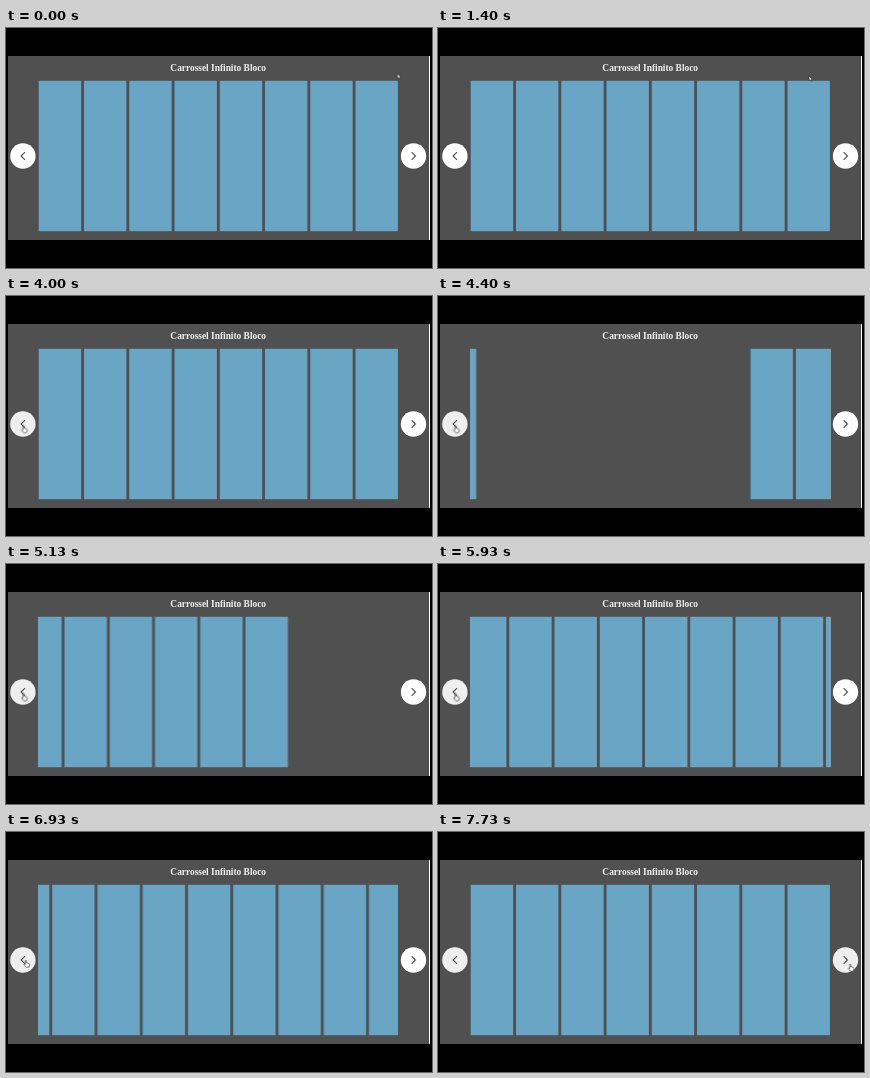
An HTML page that plays this animation: 426x240 px, repeating every 8000 ms.

```html
<!DOCTYPE html>
<html lang="pt">
<head>
<meta charset="utf-8">
<title>Carrossel</title>
<style>
  html, body { margin: 0; width: 100%; height: 100%; overflow: hidden; background: #000; }
  svg { display: block; width: 100vw; height: 100vh; }
  text { font: bold 9.4px "Liberation Serif", "Times New Roman", serif; fill: #f0f0f0; text-anchor: middle; }
  .soft { filter: blur(.35px); }
  .chevron { fill: none; stroke: #4c4c4c; stroke-width: 1.1; }
  .cursor path { fill: #fff; stroke: #222; stroke-width: .6; stroke-linejoin: round; }
</style>
</head>
<body>
<svg viewBox="0 0 426 240">
  <defs><clipPath id="view"><rect x="32.6" y="52" width="359.5" height="152"/></clipPath></defs>
  <rect x="2" y="28" width="421" height="184" fill="#505050"/>
  <rect x="423" y="28" width="1" height="184" fill="#fff"/>
  <g class="soft">
    <text x="212.2" y="43">Carrossel Infinito Bloco</text>
    <g clip-path="url(#view)"><g id="track"></g></g>
    <circle id="prev" cx="16.9" cy="128" r="12.7"/>
    <path class="chevron" d="M19 124.1 L15.1 128 L19 131.9"/>
    <circle id="next" cx="407.5" cy="128" r="12.7"/>
    <path class="chevron" d="M405.6 124.1 L409.5 128 L405.6 131.9"/>
    <g id="cursor" class="cursor">
      <path id="arrow" d="M0 0 V4.6 L1.1 3.7 L1.9 5.3 L2.7 4.9 L2 3.4 L3.3 3.3 Z"/>
      <path id="hand" d="M-.6 .4 Q0 -.4 .6 .4 V2.8 L3.2 3.5 Q3.9 3.8 3.7 4.8 L3.1 7.2 H.2 L-1.9 4.6 Q-1.8 3.8 -.6 4.5 Z"/>
    </g>
  </g>
</svg>
<script>
const LOOP = 8000, FPS = 15;
const LEFT = 32.75, PITCH = 45.25, PER_PAGE = 8, PAGE = PITCH * PER_PAGE;
const $ = id => document.getElementById(id);

// Pages queue up to the left; the first one reached is only partly filled.
const pageSizes = [8, 2, 8, 8, 8];
pageSizes.forEach((size, page) => {
  for (let i = 0; i < size; i++) {
    const block = document.createElementNS("http://www.w3.org/2000/svg", "rect");
    const attrs = { x: LEFT - page * PAGE + i * PITCH, y: 52.8, width: 42.4, height: 150.4, fill: "#69a5c4" };
    for (const name in attrs) block.setAttribute(name, attrs[name]);
    $("track").append(block);
  }
});

// steps: [time, x, y, easing to the next step]
function animate(el, steps) {
  const frames = steps.map(([time, x, y, easing = "linear"]) => ({
    offset: time / LOOP, transform: `translate(${x}px, ${y}px)`, easing
  }));
  const anim = el.animate(frames, { duration: LOOP, fill: "both" });
  anim.pause();
  return anim;
}

const SLIDE = 500;
const slideStarts = [4065, 4899, 5565, 6537];
const slides = slideStarts.flatMap((start, i) => [
  [start, i * PAGE, 0, "ease-in-out"],
  [start + SLIDE, (i + 1) * PAGE, 0]
]);
const end = slideStarts.length * PAGE;

const moves = [
  [0, 391.5, 45.8], [1267, 391.5, 45.8, "ease-in-out"],
  [1733, 271, 59], [1867, 271, 59, "ease-in-out"],
  [2733, 139.2, 73.2, "ease-in"],
  [3200, 80, 120], [3430, 42, 141, "ease-out"],
  [3600, 27, 131], [3800, 17.5, 129.5],
  [6200, 17.5, 129.5], [6467, 19.8, 128],
  [6933, 19.8, 128, "ease-in"],
  [7067, 40, 127], [7333, 210, 124, "ease-out"],
  [7733, 412.3, 132], [LOOP, 412.3, 132]
];

const anims = [
  animate($("track"), [[0, 0, 0], ...slides, [LOOP, end, 0]]),
  animate($("cursor"), moves)
];

const show = (el, on) => el.setAttribute("visibility", on ? "visible" : "hidden");
const tint = (el, on) => el.setAttribute("fill", on ? "#eeeeee" : "#ffffff");

function draw(now) {
  const t = Math.floor((now % LOOP) * FPS / 1000 + .1) * 1000 / FPS;
  anims.forEach(a => a.currentTime = Math.min(t, LOOP - 1));
  const pointing = (t > 3590 && t < 7000) || t > 7590;
  show($("hand"), pointing);
  show($("arrow"), !pointing);
  tint($("prev"), t > 3990);
  tint($("next"), t > 7660);
}

const began = performance.now();
function tick() {
  draw(performance.now() - began);
  requestAnimationFrame(tick);
}
tick();
</script>
</body>
</html>
```
